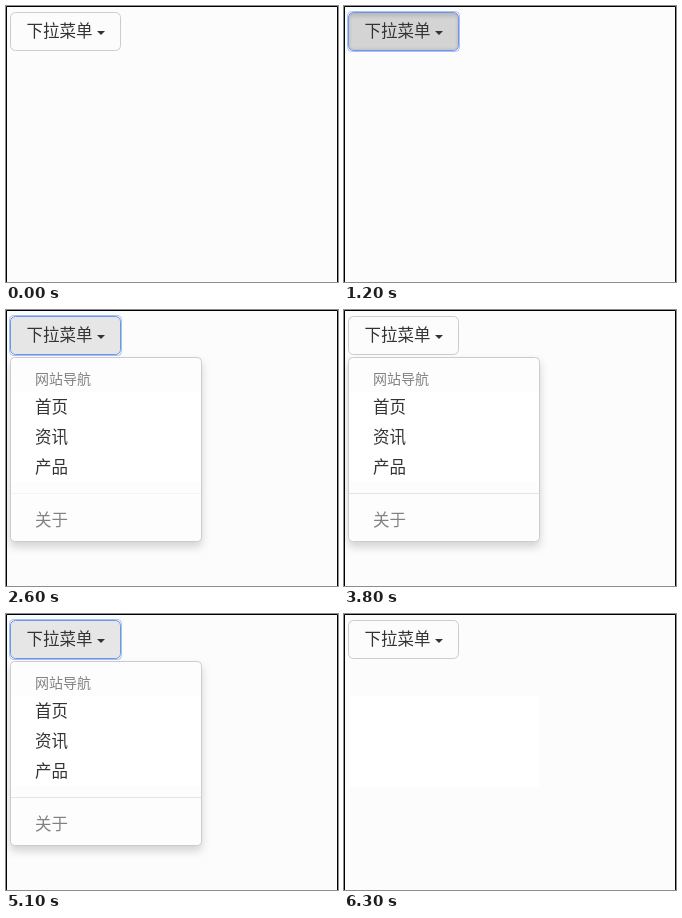
Recreate the animation shown at these times as an HTML page. Size 332 px wide and 276 px high, loop 7000 ms.

```html
<!DOCTYPE html>
<html lang="zh-CN">
<head>
<meta charset="utf-8">
<style>
html, body { margin: 0; width: 100%; height: 100%; overflow: hidden; background: #fcfcfc; }
svg { display: block; }
text { font: 16.5px "Noto Sans CJK SC", "Noto Sans CJK", sans-serif; fill: #333; }
.muted { fill: #828282; }
.small { font-size: 14px; }
#panel { filter: drop-shadow(0 5px 4px rgba(0, 0, 0, .16)); }
</style>
</head>
<body>
<svg width="332" height="276" viewBox="0 0 332 276">
  <defs>
    <filter id="soft" x="-10%" y="-20%" width="120%" height="140%"><feGaussianBlur stdDeviation="2"/></filter>
    <clipPath id="face"><rect x="5" y="7" width="109" height="37" rx="4"/></clipPath>
  </defs>
  <path d="M.5 276V.5H331.5V276" fill="none" stroke="#000"/>
  <rect id="ghost" x="5" y="82" width="190" height="90" fill="#fff"/>

  <rect id="ring" x="3.5" y="5.5" width="112" height="40" rx="4" fill="none" stroke="#a9c1f3"/>
  <rect id="button" x="4.5" y="6.5" width="110" height="38" rx="5"/>
  <g id="inset" clip-path="url(#face)">
    <path d="M-6 -4H125V55H-6ZM5 10V44H114V10Z" fill-rule="evenodd" opacity=".14" filter="url(#soft)"/>
  </g>
  <text x="20.5" y="30.5">下拉菜单</text>
  <path d="M91 25H99L95 29Z" fill="#333"/>

  <g id="menu">
    <rect id="panel" x="4.5" y="47.5" width="191" height="184" rx="4" fill="#fdfdfd" stroke="#ccc"/>
    <rect x="5" y="82" width="190" height="90" fill="#fff"/>
    <text class="muted small" x="29" y="73.5">网站导航</text>
    <text x="29" y="102.5">首页</text>
    <text x="29" y="132.5">资讯</text>
    <text x="29" y="162.5">产品</text>
    <rect id="divider" x="5" y="183" width="190" height="1"/>
    <text class="muted" x="29" y="215.5">关于</text>
  </g>
</svg>
<script>
const $ = id => document.getElementById(id);
const looks = {
  plain: { fill: '#fcfcfc', edge: '#ccc' },
  hover: { fill: '#e6e6e6', edge: '#adadad' },
  press: { fill: '#d4d4d4', edge: '#6d96e8', ring: true, inset: true },
  held: { fill: '#d4d4d4', edge: '#6d96e8', ring: true },
  focus: { fill: '#e6e6e6', edge: '#6d96e8', ring: true }
};
// start time, button look, menu open
const steps = [
  [0, 'plain', false], [700, 'hover', false], [1200, 'press', false],
  [1400, 'held', true], [1700, 'focus', true], [3800, 'plain', true],
  [3900, 'plain', false], [4600, 'hover', false], [4800, 'press', false],
  [4900, 'held', true], [5100, 'focus', true], [6100, 'plain', true],
  [6300, 'plain', false]
];
const show = (id, on) => $(id).setAttribute('visibility', on ? 'visible' : 'hidden');

function draw(now) {
  const t = now % 7000;
  const [, name, open] = steps.findLast(s => s[0] <= t);
  const look = looks[name];
  $('button').setAttribute('fill', look.fill);
  $('button').setAttribute('stroke', look.edge);
  show('ring', look.ring);
  show('inset', look.inset);
  show('menu', open);
  show('ghost', t >= 1400);
  $('divider').setAttribute('fill', t >= 2600 && t < 3800 ? '#f4f4f4' : '#e5e5e5');
  requestAnimationFrame(draw);
}
draw(performance.now());
</script>
</body>
</html>
```
